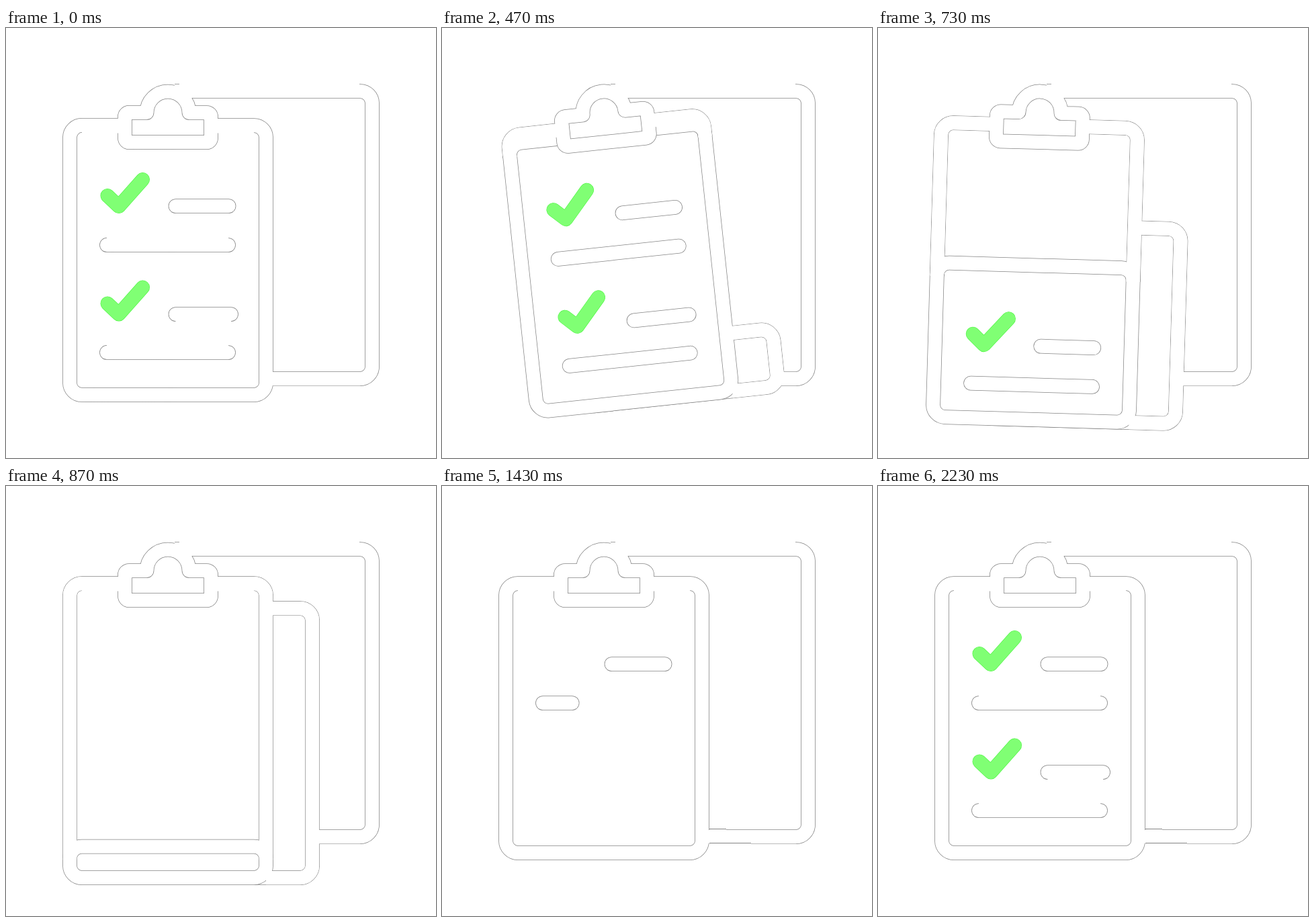
These frames come from a looping animation (640 px wide and 640 px high, 2.5 s). An HTML page:

```html
<!DOCTYPE html>
<html lang="en">
<head>
<meta charset="utf-8">
<title>Checklist</title>
<style>
  html, body { margin: 0; width: 100%; height: 100%; overflow: hidden; background: #fff; }
  svg { display: block; width: 100vw; height: 100vh; }
</style>
</head>
<body>
<svg id="stage" viewBox="0 0 640 640"></svg>
<script>
const LOOP = 2500, LINE = '#858585', R = 18, PIVOT = [241, 126];
const EDGE = 21.75, BODY = 20.25;
const stage = document.getElementById('stage');

const clamp = (v, a = 0, b = 1) => Math.min(b, Math.max(a, v));
const ease = (t, a, b) => (1 - Math.cos(Math.PI * clamp((t - a) / (b - a)))) / 2;

// Strokes: an edge pass, then a white body that merges touching shapes
const path = (d, color, w, fill = 'none') =>
  `<path d="${d}" fill="${fill}" stroke="${color}" stroke-width="${w}" stroke-linejoin="round"/>`;
const edge = (d, fill) => path(d, LINE, EDGE, fill);
const body = d => path(d, '#fff', BODY);
const solid = (d, color = '#fff') => `<path d="${d}" fill="${color}"/>`;
const box = (x, y, w, h, color) => solid(`M${x} ${y}h${w}v${h}h${-w}z`, color);

function roundRect(x1, y1, x2, y2) {
  const r = clamp((y2 - y1) / 2, 0, R), a = `a${r} ${r} 0 0 1 `;
  return `M${x1 + r} ${y1}H${x2 - r}${a}${r} ${r}V${y2 - r}${a}${-r} ${r}` +
    `H${x1 + r}${a}${-r} ${-r}V${y1 + r}${a}${r} ${-r}Z`;
}

const CLIP = 'M209.5 126A31.5 31.5 0 0 1 272.5 126H299a6 6 0 0 1 6 6V164a6 6 0 0 1 -6 6' +
  'H183a6 6 0 0 1 -6 -6V132a6 6 0 0 1 6 -6Z';
const BOARD = 'M305 145H369a18 18 0 0 1 18 18V528a18 18 0 0 1 -18 18H113a18 18 0 0 1 -18 -18' +
  'V163a18 18 0 0 1 18 -18H177';
const BACK = 'M251 94H527a18 18 0 0 1 18 18V504a18 18 0 0 1 -18 18H';

// x1, x2, y, start, end, row hidden when level
const BARS = [
  [252.5, 331.5, 265, 1067, 1333, 0],
  [150, 331, 323, 1333, 1633, 312],
  [252.5, 335, 426, 1600, 1767, 436],
  [150, 331, 483, 1733, 1933, 472]
];
// y offset, start, end
const CHECKS = [[0, 1900, 2067], [160.5, 2067, 2233]];

function swing(t) {
  const keys = [[0, 0], [200, 3.9], [467, -6.1], [667, 2.5], [833, 0]];
  for (let i = 1; i < keys.length; i++) {
    const [a, from] = keys[i - 1], [b, to] = keys[i];
    if (t < b) return from + (to - from) * ease(t, a, b);
  }
  return 0;
}

function bar([x1, x2, y, a, b, row], t, level) {
  const p = t < 1060 ? 1 : ease(t, a, b);
  if (p <= 0) return '';
  const d = `M${x1} ${y}H${x1 + (x2 - x1) * p + .01}`;
  const cap = (c, w) => `<path d="${d}" stroke="${c}" stroke-width="${w}" stroke-linecap="round"/>`;
  const hide = level && row && p === 1 ? box(x1, row, x2 - x1, 1.2) : '';
  return cap(LINE, EDGE) + cap('#fff', BODY) + hide;
}

function check([dy, a, b], t) {
  const p = t < 1060 ? 1 : ease(t, a, b);
  if (p <= 0) return '';
  const d = `M151 ${249.5 + dy}l17 16l35.5 -40`;
  const mark = (c, w) => `<path d="${d}" fill="none" stroke="${c}" stroke-width="${w}" pathLength="100" ` +
    `stroke-dasharray="${p === 1 ? 'none' : p * 100 + ' 200'}" stroke-linecap="round" stroke-linejoin="round"/>`;
  return mark('#4df542', 21) + mark('#80ff74', 19.8);
}

function content(t, slide, bottom, level) {
  return `<clipPath id="inside"><rect x="100" y="140" width="282" height="${bottom - 151}"/></clipPath>` +
    `<g clip-path="url(#inside)"><g transform="translate(0 ${slide})">` +
    BARS.map(b => bar(b, t, level)).join('') + CHECKS.map(c => check(c, t)).join('') + '</g></g>';
}

function draw(t) {
  const angle = swing(t), rad = angle * Math.PI / 180;
  const level = Math.abs(angle) < .05;

  // Old page sliding down
  const k = clamp(t - 393, 0, 560);
  const slide = t < 1033 ? .002094 * k * k * (1 - .00038 * k) : 0;
  const low = 546 + Math.min(slide, 37);
  const top = 145 + slide;
  const paged = slide > 0 && top < low - 2;
  const below = slide > 405;

  // New sheet rising, then tucking in behind the board
  const u = t - 470, home = ease(t, 880, 1033);
  const dx = 69 * ease(t, 330, 430) * (1 - home), dy = -37 * home;
  const rise = Math.max(182, 604 - (131 + .619 * u + .00027 * u * u));
  const sheeted = t > 340 && t < 1033 && low - rise > 4 && dx > .5;
  const y1 = rise + dy, y2 = low + dy, right = 387 + dx;

  const joinAt = sheeted && y1 < 510 ? right : 387;
  const end = PIVOT[0] + (joinAt - PIVOT[0] - 396 * Math.sin(rad)) / Math.cos(rad);
  const back = BACK + end;

  let out = edge(back) + body(back) + box(258, 82, 268, 2.5);
  out += `<g transform="rotate(${angle} ${PIVOT})">`;

  let bridge = '';
  if (sheeted) {
    const d = roundRect(95 + dx, y1, right, y2);
    out += edge(d, '#fff') + body(d);
    const r = Math.min(R, dx, (y2 - y1) / 2), a = `a${r} ${r} 0 0 1 `;
    bridge = body(`M387 ${y1}H${right - r}${a}${r} ${r}V${y2 - r}${a}${-r} ${r}H387`);
  }

  const page = roundRect(95, top, 387, low);
  let frame = BOARD, front = '';
  if (paged && below) out += edge(page, '#fff') + body(page);
  if (slide > 0 && !below) {
    const foot = Math.min(top + 20, low - R);
    frame = `M305 145H369a18 18 0 0 1 18 18V${foot}M95 ${foot}V163a18 18 0 0 1 18 -18H177`;
    front = page;
    out += solid(roundRect(95, 145, 387, low));
  } else {
    out += solid(roundRect(95, 145, 387, 546));
  }
  out += edge(frame);
  if (front) out += edge(front) + body(frame) + body(front);

  // The clip stays above the sliding page and merges with the board
  out += edge(CLIP, '#fff') + body(frame);
  if (level) out += box(113, 154.5, 54, 2) + box(315, 154.5, 54, 2);
  out += body(CLIP);
  out += content(t, slide, low, level && slide === 0);
  out += bridge + '</g>';

  // Joins between the back document and the parts in front
  out += body(`M527 522H${end}`);
  out += solid('M251 84.6H277V104H251Z');
  if (t > 1033) {
    out += box(398, 511, 25, 1, '#fff') + box(398, 510, 25, 1, LINE);
    out += box(398, 532, 62, 1, '#fff') + box(398, 531, 62, 1, LINE);
  }
  stage.innerHTML = out;
}

function tick() {
  draw(performance.now() % LOOP);
  requestAnimationFrame(tick);
}
tick();
</script>
</body>
</html>
```
